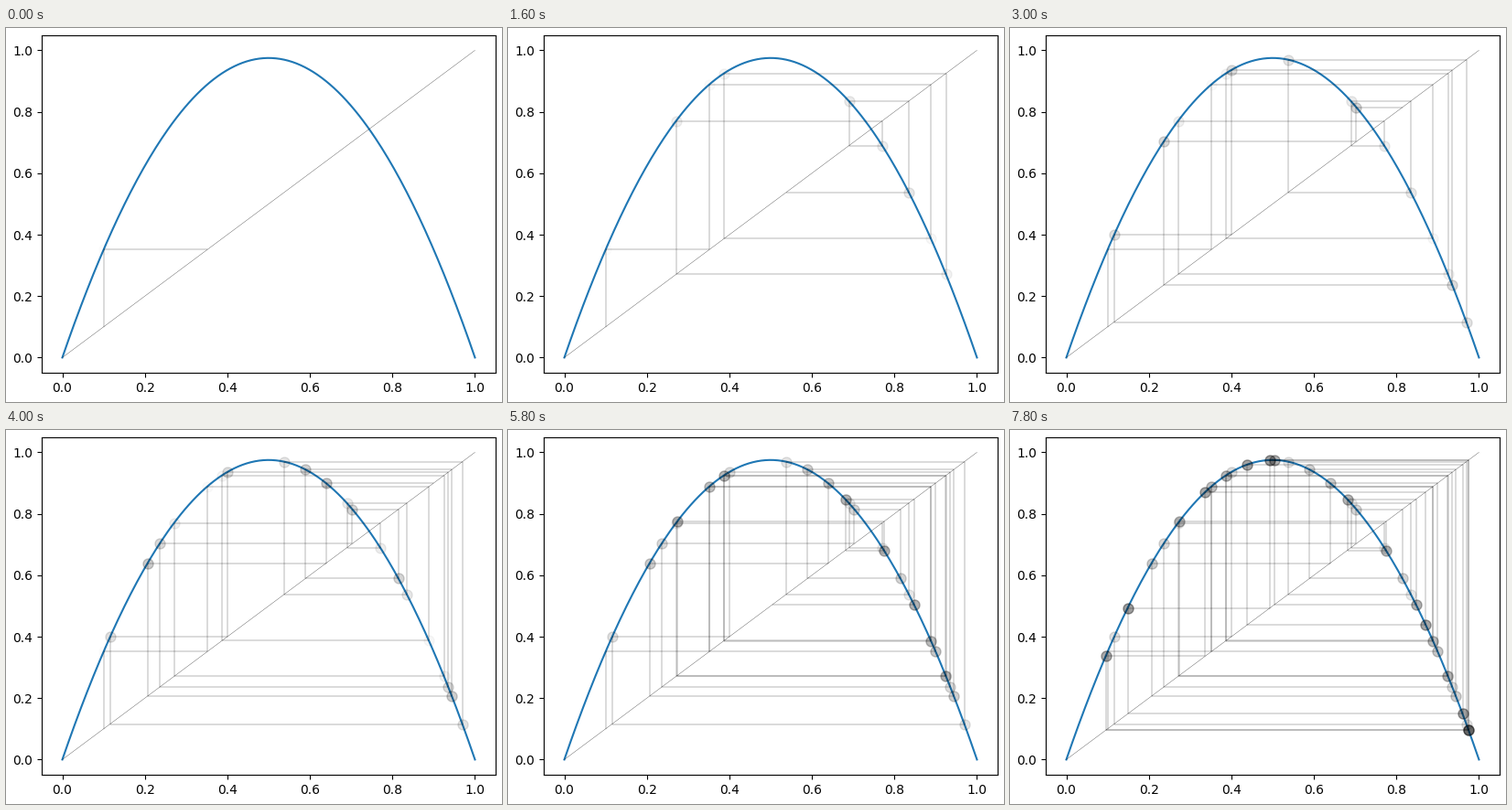
Animation of 542 by 409 pixels, one loop 8000 ms. Source, as a matplotlib script:

```python
import matplotlib.pyplot as plt
import numpy as np
from matplotlib.animation import FuncAnimation

W, H, DPI = 542, 409, 100
STEPS, INTERVAL = 40, 200
R, X0 = 3.9, 0.1
FADE_STEPS = 100  # marker opacity grows by 1/FADE_STEPS per iteration


def logistic(x):
    return R * x * (1 - x)


# the small excess keeps the pixel size from rounding down
fig = plt.figure(figsize=((W + 0.001) / DPI, (H + 0.001) / DPI), dpi=DPI)
ax = fig.add_axes([39 / W, 31.8 / H, 496 / W, 369.6 / H])
ax.set_xlim(-0.05, 1.05)
ax.set_ylim(-0.05, 1.05)

thin = dict(color="k", lw=0.2)
t = np.linspace(0, 1, 200)
ax.plot(t, logistic(t))
ax.plot([0, 1], [0, 1], **thin)

# one group of artists per iteration of the map
groups = []
x = X0
for i in range(STEPS):
    y = logistic(x)
    groups.append(
        ax.plot([x, x], [x, y], **thin)
        + ax.plot([x, y], [y, y], **thin)
        + ax.plot([x], [y], "ok", ms=8, alpha=(i + 1) / FADE_STEPS)
    )
    x = y


def update(frame):
    for i, group in enumerate(groups):
        for artist in group:
            artist.set_visible(i <= frame)
    return [artist for group in groups for artist in group]


def init():
    return update(0)


anim = FuncAnimation(fig, update, frames=STEPS, init_func=init,
                     interval=INTERVAL, repeat=True, repeat_delay=0)
plt.show()
```
